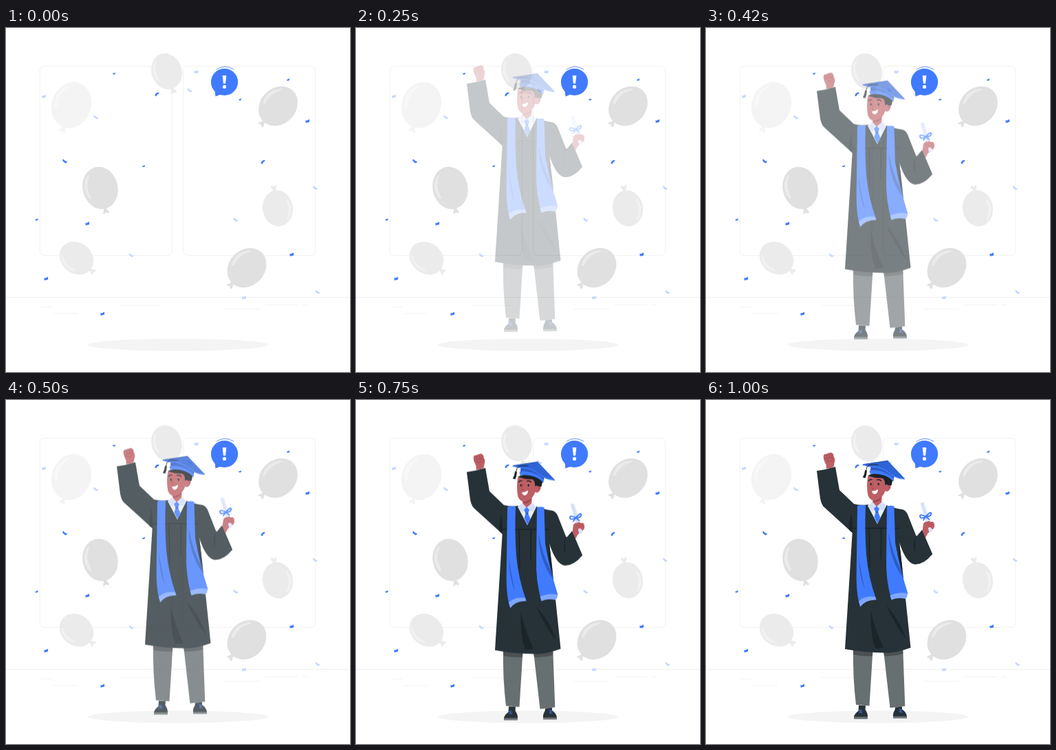
An HTML page with a canvas that plays this animation: 500x500 px, repeating every 1040 ms.

```html
<!DOCTYPE html>
<html lang="en">
<head>
<meta charset="utf-8">
<title>Graduate</title>
<style>
html, body { margin: 0; width: 100%; height: 100%; overflow: hidden; background: #fff; }
canvas { display: block; width: 500px; height: 500px; }
</style>
</head>
<body>
<canvas id="stage"></canvas>
<script>
const SIZE = 500, LOOP = 1040, FPS = 24;
const BLUE = '#407bff', PALE = '#c5d7ff', GOWN = '#263238', FOLD = '#1a2429', SKIN = '#bd5f64';
const SKIN_DARK = '#9c454c', NAVY = '#2c5cc5', PAPER = '#dfe7fb', INK = '#1b2327';
const dpr = window.devicePixelRatio || 1;

function makeLayer(canvas) {
  canvas.width = canvas.height = SIZE * dpr;
  const c = canvas.getContext('2d');
  c.scale(dpr, dpr);
  c.lineCap = c.lineJoin = 'round';
  return c;
}

function fill(c, color, d) {
  c.fillStyle = color;
  c.fill(new Path2D(d));
}

function line(c, color, width, d) {
  c.strokeStyle = color;
  c.lineWidth = width;
  c.stroke(new Path2D(d));
}

function oval(c, color, x, y, rx, ry = rx, turn = 0) {
  c.fillStyle = color;
  c.beginPath();
  c.ellipse(x, y, rx, ry, turn * Math.PI / 180, 0, Math.PI * 2);
  c.fill();
}

function placed(c, x, y, turn, draw) {
  c.save();
  c.translate(x, y);
  c.rotate(turn * Math.PI / 180);
  draw();
  c.restore();
}

function balloon(c, x, y, rx, ry, turn, color, shine) {
  placed(c, x, y, turn, () => {
    fill(c, color, `M-1,${ry - 2} L-4.5,${ry + 7} Q-1.5,${ry + 8} 0,${ry + 5} Q2,${ry + 9} 5,${ry + 6} L1,${ry - 2} Z`);
    oval(c, color, 0, 0, rx, ry);
    c.scale(rx, ry);
    fill(c, shine, 'M-.74,.38 Q-1.1,-.2 -.55,-.7 Q-.42,-.76 -.46,-.66 Q-.84,-.22 -.62,.32 Q-.66,.44 -.74,.38 Z');
  });
}

function confetti(c, color, kind, spots) {
  const shapes = {
    wave: 'M-3,-.8 Q0,.2 2.6,-2.6 Q3.6,-1 3,1.6 Q.4,3 -2.5,2.7 Q-2,1 -3,-.8 Z',
    hook: 'M-2.4,-3 Q-.6,-.2 3.3,.6 Q3,2.3 1.2,2.9 Q-2.4,2 -3.6,-1.2 Q-3.5,-2.5 -2.4,-3 Z'
  };
  for (const [x, y, turn = 0, scale = 1] of spots) {
    placed(c, x, y, turn, () => {
      c.scale(scale, scale);
      fill(c, color, shapes[kind]);
    });
  }
}

function drawBubble(c) {
  oval(c, BLUE, 317.5, 78.5, 19.6);
  fill(c, BLUE, 'M303.5,90 L304.5,99.5 L312,96.5 Z');
  line(c, BLUE, .8, 'M306,60 Q318,52.5 331,60');
  fill(c, '#fff', 'M314.7,69 H320.3 L319.1,80.8 H315.9 Z');
  oval(c, '#fff', 317.5, 85.4, 2.6);
}

function drawScene(c) {
  c.fillStyle = '#fff';
  c.fillRect(0, 0, SIZE, SIZE);
  c.strokeStyle = '#f1f1f1';
  c.lineWidth = 1;
  for (const x of [49.2, 257.7]) {
    c.beginPath();
    c.roundRect(x, 55.5, 192, 275, 6);
    c.stroke();
  }
  line(c, '#ebebeb', .8, 'M0,391.5 H500');
  line(c, '#ededed', .7, 'M51,405.3 H67 M69,415 H104 M168,403.3 H223 M317,408.8 H368 M377,402.3 H423 M431,402.3 H437');
  oval(c, '#f4f4f4', 250, 460.5, 131, 9);

  balloon(c, 95, 112, 28.5, 34, 20, '#f4f4f4', '#f8f8f8');
  balloon(c, 233.5, 63, 22, 26.5, -18, '#ebebeb', '#f2f2f2');
  balloon(c, 137, 232.5, 25.5, 31, -13, '#e0e0e0', '#ebebeb');
  balloon(c, 395.5, 113.5, 26, 31, 43, '#e0e0e0', '#ebebeb');
  balloon(c, 102.5, 334.5, 22.3, 26.3, -50, '#ebebeb', '#f2f2f2');
  balloon(c, 395, 262, 22, 26.3, 170, '#ebebeb', '#f2f2f2');
  balloon(c, 350, 348.5, 26, 31, 43, '#e0e0e0', '#ebebeb');

  confetti(c, BLUE, 'wave', [[157, 66, 10, .6], [410, 75, 0, .65], [438, 135], [340, 103.7, 0, .6],
    [200, 200.5, 0, .6], [44.5, 278.3, 0, .65], [118, 284], [58, 364], [140, 415], [415, 328.8]]);
  confetti(c, BLUE, 'hook', [[85.7, 193.5], [219.3, 96.6, 105, .95], [373.4, 195, 100, .95]]);
  confetti(c, PALE, 'wave', [[54.7, 99], [276.5, 63.3, 15], [345.8, 391.3, 12]]);
  confetti(c, PALE, 'hook', [[130.8, 129.5], [267.2, 90.5], [449.5, 232.3], [334, 278.5], [182.3, 330.2], [453, 383.8]]);
  drawBubble(c);
}

function drawLegs(c) {
  fill(c, '#686f71', 'M214,355 H243 L237.5,444.5 L218,443 Q213,402 214,355 Z');
  fill(c, '#686f71', 'M257,355 H286 L289.3,445 L267.5,447.5 Z');
  fill(c, '#4b5153', 'M214,360 H242.5 L242,372 Q227,373 214.3,370 Z');
  fill(c, '#4b5153', 'M257.5,360 H286 L286.3,369 Q273,373 259,372 Z');
  fill(c, GOWN, 'M222,443.7 L232,444.2 L231.5,450 Q235.5,456 235,461 H215 Q215.5,456 221.5,452 Z');
  fill(c, GOWN, 'M275,446.8 L285,445.5 L285,449.5 Q291.5,454 292,460 H272 Q271.5,455 274.5,450.5 Z');
  fill(c, '#6d7477', 'M215,460.5 H235 V463.7 H215 Z M272,459.7 H292 V462.7 H272 Z');
  line(c, BLUE, .8, 'M222.5,452 L226.5,450.5 M222.5,454.5 L227,453 M223,450 L226,455 M280.5,449 L285,451.5 M281,452.5 L285.5,454 M284,449 L282,454');
}

function drawGown(c) {
  fill(c, GOWN, `M161,103 Q175,101 188,97 L194,131 L215,151 Q225,154 236,152 L249,180 L262,153
    Q276,158 285,159 Q290,160 293,166 L306,199 L314,189 L329,224 Q317,239 304,239
    Q291,238 281,207 L285,240 L297.5,360 Q277,367.5 262,367.5 Q229,367 202,362
    L212.7,193 L172,156 Q168,153 166,143 Z`);
  fill(c, FOLD, 'M212,165 Q207,178 208,189 L213,193 Z');
  fill(c, FOLD, 'M239.5,307 Q246,335 258,360 L246,361 Q239,342 239.5,307 Z');
  fill(c, FOLD, 'M262,299 Q281,318 291,348 Q278,332 262,299 Z');
  fill(c, FOLD, 'M306,199 Q301,208 303,219 Q304,209 309,196 Z');
  fill(c, FOLD, 'M281,207 Q283,225 285.5,247 L280,232 Z');
  line(c, '#10181c', .8, 'M213,186.3 H280 M237,187 L238,243 M254.5,187 L254,231');
}

function drawChest(c) {
  fill(c, SKIN, 'M243,137 L256,137 L255,151 L248,157 L242,151 Z');
  fill(c, SKIN_DARK, 'M243,144 Q250,146 255,140 L254,144 Q249,150 243,148 Z');
  fill(c, '#e8eefc', 'M242,148.5 L248,155 L256,148 L262,154 L249,180 L235,153.5 Z');
  fill(c, '#d3def8', 'M242,148.5 L248,155 L241,162 L235,153.5 Z M256,148 L248,155 L257,161 L262,154 Z');
  fill(c, BLUE, 'M248,154 L252,158 L250,163 L253.5,171 L249.3,180 L244.5,170 L246.7,163 L244,158 Z');
  fill(c, NAVY, 'M246.7,162 H250.2 L250.6,164 H246.3 Z');

  fill(c, BLUE, 'M220,154 Q226,151.5 232,153.5 Q230.5,190 233,225 Q236,258 247.5,290 Q232,289 224,300.5 Q218,282 218.7,250 Z');
  fill(c, '#7fa7ff', 'M222,292.5 Q231,284 246,286 L247.5,290.5 Q232,290 224.5,300.5 Z');
  fill(c, NAVY, 'M222,227 Q223,257 231,276 Q225,250 222,227 Z');
  fill(c, BLUE, 'M263,154.5 Q269,152.5 273.5,154.5 L275,207 Q281,242 293,280 Q293,285 290,288.5 Q279,286 269.5,290.5 Q261,261 262,230 Z');
  fill(c, '#7fa7ff', 'M267.5,284 Q280,278.5 292.5,281 Q293,286 290,289 Q279,286.5 269.5,290.5 Z');
  fill(c, NAVY, 'M265.5,193 Q270,221 284,248 L286,258 Q266,231 265.5,193 Z');
}

function drawFist(c) {
  fill(c, SKIN, `M174.5,98 Q175.5,95 173,91 Q170,85 171,80 Q173,77.5 175,79 Q176,76.5 179,77.5
    Q181,75 183.5,77.5 Q186,79 185.5,82 Q188.5,86 186.5,92 L185.5,97 Q180,100 174.5,99.5 Z`);
  line(c, SKIN_DARK, .7, 'M175,79 L176,84 M179,77.5 L180,83 M183,78 L183,83 M173,86 Q178,83 184,84 M176,88 Q181,91 185,86');
}

function drawDiploma(c) {
  fill(c, SKIN, 'M305.5,200 L314.5,190 L316,180 Q318,176.5 322,177 L330,177 Q333,180 331.5,185 Q330,190 323,193 L319,200 Z');
  fill(c, PAPER, 'M311.5,150.5 Q314.5,147.5 317,149 L330,189 Q328,193.5 324.5,192.5 Z');
  line(c, '#b9c9ee', .6, 'M314,150 L326,191');
  fill(c, SKIN, 'M316,181 Q318,176 322,177 Q324,174 327,178 Q331,176 331.5,181 Q333,185 329,188 Q324,182 323,187 Q320,191 316,189 Z');
  line(c, SKIN_DARK, .7, 'M321,180 Q324,181 326,184 M326,178 L329,183');
  line(c, BLUE, 1.9, 'M319.5,169.5 Q311,165 311,169 Q311.5,174 319.5,169.5 Q327,161 327.5,165 Q326.5,170 319.5,169.5 M319,170 L316,174.5 M320,170 L324.5,173.5');
  fill(c, GOWN, 'M303,202 L314,189 L329,224 Q318,235 306,232 Z');
  line(c, FOLD, .9, 'M306,197 Q301,206 303,220');
}

function drawHead(c) {
  fill(c, INK, 'M237,104 Q250,99 272,112 Q271,123 267,126 L259,126 L255,112 Z');
  fill(c, SKIN, 'M235.5,110 Q246,105 259,113 L260.5,123 Q264,118.5 268,121 Q270,127 266,131.5 Q263,134 260.5,132 Q257,143 246,146 Q239,147 235.5,139 Q232.5,124 235.5,110 Z');
  fill(c, INK, 'M235.5,110 Q246,103.5 263,110 Q271,113 270,123.5 Q266,125 262.5,122.5 L260.5,124 Q260.5,115 256,113.5 Q246,114 235.5,110 Z');
  line(c, SKIN_DARK, .8, 'M264,124.5 Q267,123.5 266,128 M243,121 Q240,126 241.5,129 Q243,129.5 244,128.5');
  line(c, INK, 1.3, 'M236.5,117.5 Q238,115 241,115.7 M248.5,116.2 Q252,114.8 254.5,117.5');
  oval(c, INK, 239.7, 122.3, 1.1, 1.8);
  oval(c, INK, 250.7, 122.3, 1.2, 1.8);
  fill(c, '#fff', 'M241,132.5 Q246,132.7 250,129.8 Q250.3,135.5 245.5,137 Q242,136.7 241,132.5 Z');
}

function drawCap(c) {
  fill(c, BLUE, 'M239.5,97 Q256,92 274,105 L272.5,119 Q262,106 238,107.5 Z');
  fill(c, NAVY, 'M240,97 Q256,94 273.5,111 L273,114.5 Q260,101 239,102 Z');
  fill(c, '#2f64d6', 'M227.5,93.7 L264,88 L289,114.3 Q275,113.5 266,106 Q254,96.5 240,97 Z');
  line(c, BLUE, 1.3, 'M228,94.2 Q235,97 242,97 Q254,96.5 266,106 Q275,113.5 288.5,114.8');
  line(c, '#234b9f', .8, 'M229,93.5 L264,88.3');
  c.setLineDash([4, 2.5]);
  line(c, '#e4ecff', .8, 'M267,88.5 L288,109');
  c.setLineDash([]);
  line(c, INK, 1, 'M250,94 L238,94.2 Q233,96 232.5,104');
  fill(c, INK, 'M231.2,102 L234,102.5 Q233.5,109 231.5,113.5 L227.8,112.5 Q230.5,108 231.2,102 Z');
}

function drawGraduate(c) {
  drawLegs(c);
  drawFist(c);
  drawGown(c);
  drawChest(c);
  drawHead(c);
  drawCap(c);
  drawDiploma(c);
}

// Cubic Bezier easing, solved for x by bisection.
function ease(x, x1 = .36, y1 = -.01, x2 = .5, y2 = 1.38) {
  const at = (s, a, b) => 3 * a * s * (1 - s) ** 2 + 3 * b * s * s * (1 - s) + s ** 3;
  let lo = 0, hi = 1;
  for (let i = 0; i < 24; i++) {
    const mid = (lo + hi) / 2;
    if (at(mid, x1, x2) < x) lo = mid; else hi = mid;
  }
  return at(lo, y1, y2);
}

const stage = makeLayer(document.getElementById('stage'));
const sceneLayer = document.createElement('canvas');
const figureLayer = document.createElement('canvas');
drawScene(makeLayer(sceneLayer));
drawGraduate(makeLayer(figureLayer));

const start = performance.now();

function render(now) {
  const t = Math.max(0, now - start) % LOOP;
  const step = Math.floor(t * FPS / 1000 + .1);
  stage.globalAlpha = 1;
  stage.drawImage(sceneLayer, 0, 0, SIZE, SIZE);
  if (step >= 3) {
    const e = ease(Math.min(1, (step + .5) / FPS));
    stage.globalAlpha = Math.max(0, Math.min(1, e));
    stage.drawImage(figureLayer, 0, -30 * (1 - e), SIZE, SIZE);
  }
  requestAnimationFrame(render);
}
render(start);
</script>
</body>
</html>
```
